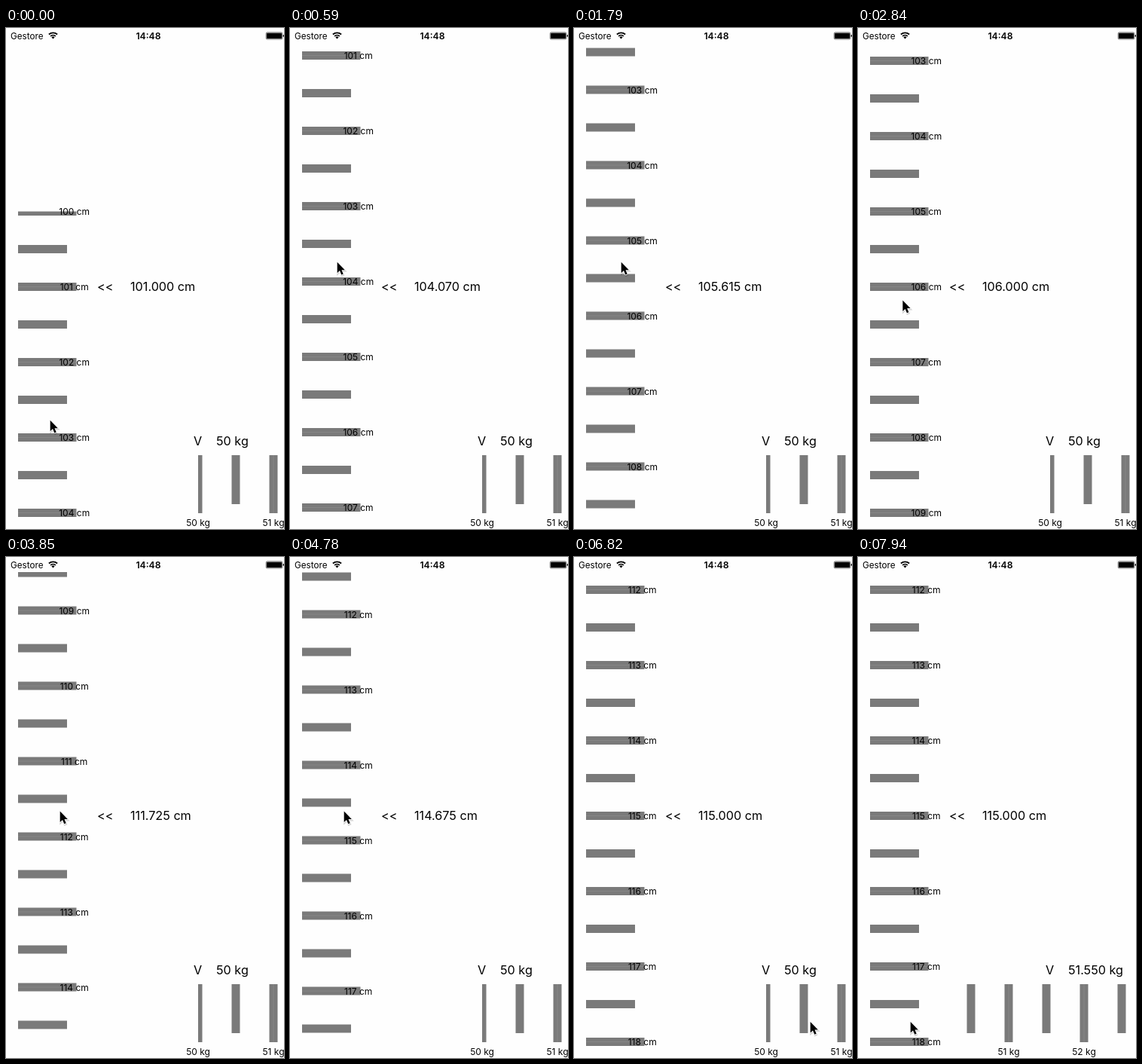
Recreate the animation shown at these times as an HTML page. Size 369 by 665 pixels, loop 7990 ms.

```html
<!DOCTYPE html>
<html lang="it">
<head>
<meta charset="utf-8">
<title>Height and weight rulers</title>
<style>
  html, body { margin: 0; width: 100%; height: 100%; overflow: hidden; background: #fefefe; }
  svg { display: block; width: 369px; height: 665px; font: 12px Inter, Roboto, sans-serif; }
  .big { font-size: 16.2px; }
  .mid { text-anchor: middle; }
  .bar { fill: #7a7a7a; }
  .seam { fill: #868686; }
</style>
</head>
<body>
<svg viewBox="0 0 369 665" xmlns="http://www.w3.org/2000/svg">
  <defs>
    <clipPath id="tall"><rect y="20" width="120" height="645"/></clipPath>
    <clipPath id="wide"><rect x="141" y="560" width="228" height="105"/></clipPath>
  </defs>

  <g clip-path="url(#tall)"><g id="heights"></g></g>
  <g clip-path="url(#wide)"><g id="weights"></g></g>

  <g id="status">
    <text x="6" y="14.5" font-size="11.7">Gestore</text>
    <g fill="none" stroke="#000" stroke-width="1.8">
      <path d="M56.9 8.5A8.2 8.2 0 0 1 68.1 8.5M59.1 10.9A5 5 0 0 1 65.9 10.9"/>
    </g>
    <path d="M62.5 14.6L60.4 12.3A3 3 0 0 1 64.6 12.3Z"/>
    <text class="mid" x="189" y="14.5" font-size="12.2" font-weight="600">14:48</text>
    <rect x="345.2" y="5.9" width="21.6" height="9" rx="1.6" fill="none" stroke="#000" stroke-width=".6"/>
    <rect x="346" y="6.7" width="20" height="7.4" rx=".8"/>
    <path d="M367.6 8.8Q369 9 369 10.4T367.6 12Z"/>
  </g>

  <g class="big">
    <text x="121" y="349.2">&lt;&lt;</text>
    <text id="height" x="165" y="349.2"></text>
    <text class="mid" x="254.6" y="554.4">V</text>
    <text id="weight" x="279" y="554.4"></text>
  </g>

  <g id="cursor">
    <path d="M0 0V14.5L3.3 11.4 5.6 16.8 8 15.8 5.8 10.5H10.2Z" transform="translate(.5 1.4)"
      fill="#000" stroke="#000" stroke-width="2" opacity=".16"/>
    <path d="M0 0V14.5L3.3 11.4 5.6 16.8 8 15.8 5.8 10.5H10.2Z"
      stroke="#fff" stroke-width="1.6" paint-order="stroke" stroke-linejoin="round"/>
  </g>
</svg>

<script>
const LOOP = 7990, UNIT = 100, TAU = 480.5;
const $ = id => document.getElementById(id);

// Bursts of movement: first step, last step, number of steps
const bursts = [
  [60, 820, 14], [880, 1620, 14], [1680, 2420, 14], [2480, 2540, 2],
  [2720, 3080, 6], [3320, 4080, 14], [4140, 4890, 14], [4950, 5710, 14],
  [5770, 6170, 8], [6410, 6820, 8], [7720, 7940, 5]
];

function add(parent, tag, attrs, text) {
  const el = document.createElementNS("http://www.w3.org/2000/svg", tag);
  for (const k in attrs) el.setAttribute(k, attrs[k]);
  if (text) el.textContent = text;
  parent.appendChild(el);
}

// One mark per half unit; the very first is only half as thick
function ruler(parent, from, to, draw) {
  for (let n = from; n <= to; n += 0.5) {
    const first = n === from, whole = n % 1 === 0;
    draw(parent, n, (n - from) * UNIT, first ? 0 : -5.5, first ? 5.5 : 11, whole);
  }
}

ruler($("heights"), 100, 120, (g, n, pos, off, size, whole) => {
  const width = whole ? 77.5 : 65;
  add(g, "rect", { class: "bar", x: 16, y: pos + off, width, height: size });
  if (!whole) return;
  if (off) add(g, "rect", { class: "seam", x: 16, y: pos - 0.5, width, height: 1 });
  add(g, "text", { class: "mid", x: 90.7, y: pos + 4.6 }, n + " cm");
});

ruler($("weights"), 50, 55, (g, n, pos, off, size, whole) => {
  const height = whole ? 77 : 65;
  add(g, "rect", { class: "bar", x: pos + off, y: 567, width: size, height });
  if (!whole) return;
  if (off) add(g, "rect", { class: "seam", x: pos - 0.5, y: 567, width: 1, height });
  add(g, "text", { class: "mid", x: pos, y: 661.4 }, n + " kg");
});

const lerp = (a, b, p) => a + (b - a) * p;
const span = (t, a, b) => Math.min(1, Math.max(0, (t - a) / (b - a)));
const ease = p => (1 - Math.cos(Math.PI * p)) / 2;
const coast = (t, t0, from, far) => from + far * (1 - Math.exp((t0 - t) / TAU));
const snap = v => Math.round(v * 200) / 200;

function stepTime(t) {
  let out = 0;
  for (const [a, b, n] of bursts) {
    if (t < a) break;
    const d = (b - a) / (n - 1);
    out = a + Math.min(n - 1, Math.floor((t - a + 6) / d)) * d;
  }
  return out;
}

const flick1 = t => coast(t, 586.2, 104.07, 1.68119);
const flick2 = t => coast(t, 3846.2, 111.725, 3.4496);
const drag1 = t => span(t, 20, 350);
const drag2 = t => span(t, 3270, 3490) ** 1.7;
const swipe = t => 244 * span(t, 7670, 7940) ** 1.56;

// Drag, coast, then settle on the nearest whole unit
function heightAt(t) {
  if (t < 350) return lerp(101, flick1(350), drag1(t));
  if (t < 2250) return flick1(t);
  if (t < 3270) return lerp(flick1(2250), 106, ease(span(t, 2250, 2540)));
  if (t < 3490) return lerp(106, flick2(3490), drag2(t));
  if (t < 5890) return flick2(t);
  return lerp(flick2(5890), 115, ease(span(t, 5890, 6170)));
}

const weightAt = t => 50 + Math.max(0, swipe(t - 60) - 10) / UNIT;

function cursorAt(t) {
  if (t < 2660) {
    const p = drag1(t);
    return [lerp(58.7, 62.7, p), lerp(520.7, 310.7, p)];
  }
  if (t < 3270) {
    const p = ease(span(t, 2660, 3080));
    return [lerp(62.7, 68, p) - 7 * Math.sin(Math.PI * p), lerp(310.7, 537, p)];
  }
  if (t < 6350) {
    const p = drag2(t);
    return [lerp(68, 71.7, p), lerp(537, 337.5, p)];
  }
  const p = ease(span(t, 6350, 6820));
  return [lerp(71.7, 313.7, p) - swipe(t), lerp(337.5, 617, p)];
}

function draw(now) {
  const t = stepTime(now % LOOP);
  const h = snap(heightAt(t)), w = snap(weightAt(t)), [x, y] = cursorAt(t);
  $("heights").setAttribute("transform", `translate(0 ${343.5 - (h - 100) * UNIT})`);
  $("weights").setAttribute("transform", `translate(${255 - (w - 50) * UNIT} 0)`);
  $("cursor").setAttribute("transform", `translate(${x} ${y})`);
  $("height").textContent = h.toFixed(3) + " cm";
  $("weight").textContent = (w > 50 ? w.toFixed(3) : "50") + " kg";
}

let start;
function tick(now) {
  start ??= now;
  draw(Math.max(0, now - start));
  requestAnimationFrame(tick);
}
draw(0);
requestAnimationFrame(tick);
</script>
</body>
</html>
```
